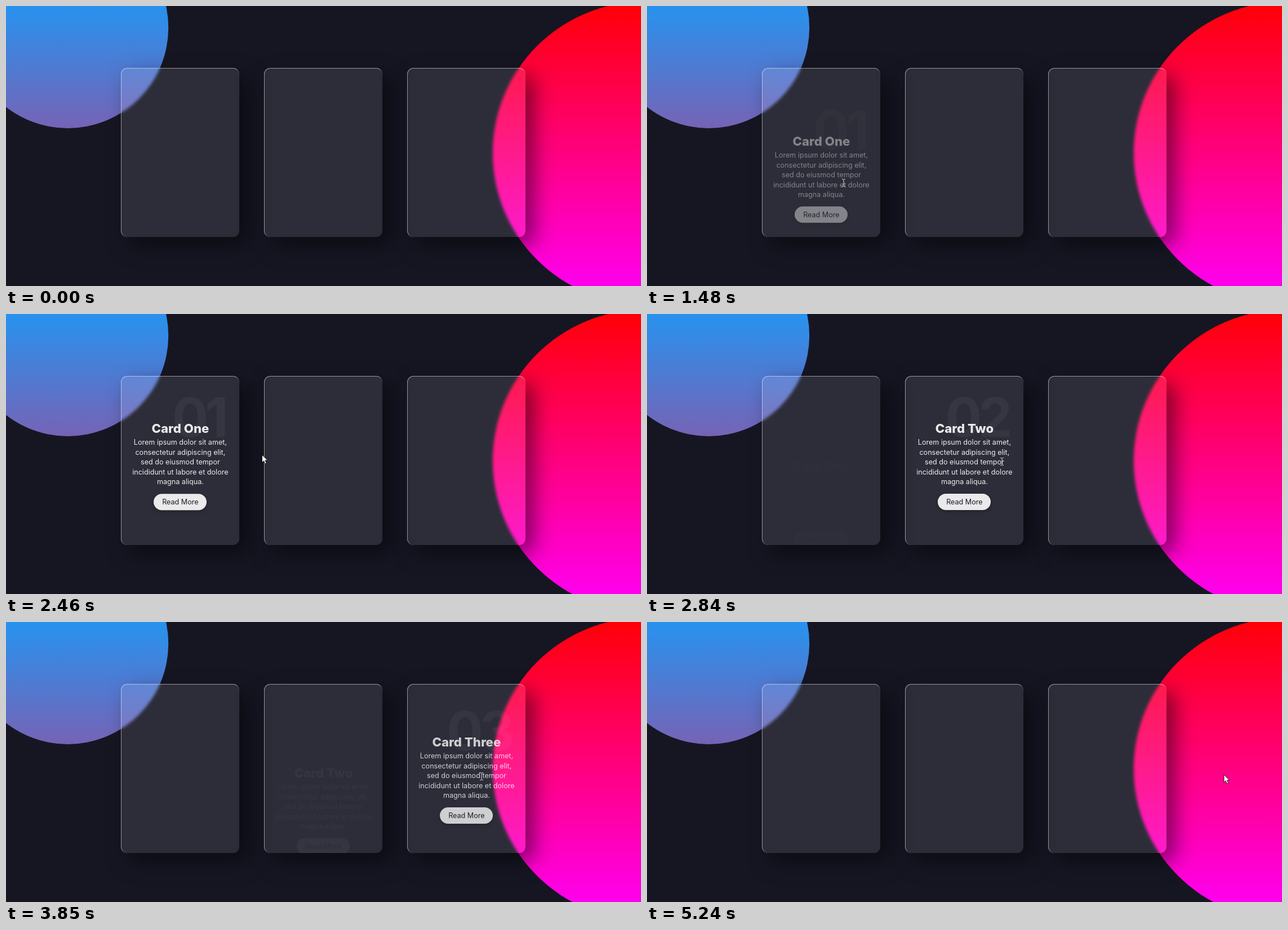
These frames come from a looping animation (1127 by 497 pixels, 5470 ms). An HTML page:

```html
<!DOCTYPE html>
<html lang="en">
<head>
<meta charset="utf-8">
<title>Glass cards</title>
<style>
  html, body { margin: 0; width: 100%; height: 100%; overflow: hidden; background: #161623; }
  body { position: relative; font-family: Inter, "Open Sans", sans-serif; }
  * { box-sizing: border-box; }

  .glow { position: absolute; left: -4px; top: -17px; width: 1136px; height: 553px; }
  .red { background: linear-gradient(#f00, #f0f); clip-path: circle(268.2px at 1136px 277.7px); }
  .blue { background: linear-gradient(#2196f3, #e91e63); clip-path: circle(178.6px at 113.6px 55.3px); }

  .card {
    position: absolute; top: 110px; width: 210px; height: 300px; overflow: hidden;
    border-radius: 11px; background: rgba(255, 255, 255, .1);
    border-top: 1px solid rgba(255, 255, 255, .5);
    border-left: 1px solid rgba(255, 255, 255, .5);
    box-shadow: 15px 15px 37px rgba(0, 0, 0, .5);
    backdrop-filter: blur(2.8px);
  }
  .content { position: absolute; left: -.6px; top: -1px; width: 210px; height: 300px; color: #fff; text-align: center; }
  .content > * { position: absolute; margin: 0; white-space: nowrap; }
  h2 { right: 26px; top: 16px; font-size: 95.6px; line-height: 100px; letter-spacing: -6px; color: rgba(255, 255, 255, .05); }
  h3 { left: 0; width: 100%; top: 71px; font-size: 22.2px; line-height: 30px; font-weight: 800; }
  p { left: 0; width: 100%; top: 102px; font-size: 12.6px; line-height: 17.5px; }
  .button {
    left: 58px; top: 202px; width: 94px; height: 29px; border-radius: 15px;
    background: #fff; color: #1c1a24; font-size: 12.6px; line-height: 29px;
    box-shadow: 0 3px 7px rgba(0, 0, 0, .25);
  }
  #cursor { position: absolute; left: 0; top: 0; width: 30px; height: 30px; overflow: visible; }
</style>
</head>
<body>
<div class="glow red"></div>
<div class="glow blue"></div>
<svg id="cursor">
  <path id="arrow" d="M0 0V13.6L3.1 10.7L5.3 15.8L7.7 14.8L5.5 9.8H9.8Z" fill="#fff" stroke="#000" stroke-width=".8"/>
  <path id="beam" d="M-3 -6.5H-1L0 -5.5L1 -6.5H3M0 -5.5V5.5M-3 6.5H-1L0 5.5L1 6.5H3" fill="none" stroke="#ddd" stroke-width="1"/>
</svg>
<script>
const LOOP = 5470, FADE = 500, RISE = 74.7;
const TOP = 110, WIDTH = 210, PITCH = 254, LEFT = 204;

const cards = [
  { name: 'One', enter: 1355, leave: 2410 },
  { name: 'Two', enter: 2525, leave: 3480 },
  { name: 'Three', enter: 3615, leave: 4765 }
];

// time, x, y of the pointer
const path = [
  [190, 1029, 489], [450, 775, 465], [700, 532, 453], [950, 440, 447],
  [1250, 391, 446], [1355, 383, 405], [1480, 349, 314], [1750, 336, 288],
  [2150, 336, 288], [2370, 412, 262], [2460, 454, 250], [2840, 630, 262],
  [3360, 630, 262], [3440, 668, 268], [3575, 713, 272], [3850, 844, 274],
  [4440, 844, 274], [4735, 920, 283], [4770, 935, 283], [4940, 1024, 271]
];

const cursor = document.getElementById('cursor');
const arrow = document.getElementById('arrow');
const beam = document.getElementById('beam');

cards.forEach((card, i) => {
  const box = document.createElement('div');
  box.className = 'card';
  card.x = LEFT + i * PITCH;
  box.style.left = card.x + 'px';
  box.innerHTML = `<div class="content"><h2>0${i + 1}</h2><h3>Card ${card.name}</h3>
    <p>Lorem ipsum dolor sit amet,<br>consectetur adipiscing elit,<br>sed do eiusmod tempor<br>
    incididunt ut labore et dolore<br>magna aliqua.</p><div class="button">Read More</div></div>`;
  document.body.insertBefore(box, cursor);
  card.content = box.firstChild;
});

const bezier = (a, b, u) => 3 * a * u * (1 - u) ** 2 + 3 * b * u * u * (1 - u) + u ** 3;

// CSS "ease": cubic-bezier(.25, .1, .25, 1)
function ease(t) {
  if (t <= 0) return 0;
  if (t >= 1) return 1;
  let lo = 0, hi = 1;
  for (let i = 0; i < 24; i++) {
    const mid = (lo + hi) / 2;
    if (bezier(.25, .25, mid) < t) lo = mid; else hi = mid;
  }
  return bezier(.1, 1, lo);
}

function pointAt(t) {
  const i = path.findIndex(p => p[0] > t);
  if (i < 0) return path[path.length - 1].slice(1);
  const [t0, x0, y0] = path[i - 1], [t1, x1, y1] = path[i];
  const k = (t - t0) / (t1 - t0);
  return [x0 + (x1 - x0) * k, y0 + (y1 - y0) * k];
}

function overText(x, y) {
  return cards.some(c => {
    const dx = x - c.x, dy = y - TOP - c.shift;
    return dx > 15 && dx < WIDTH - 15 && dy > 71 && dy < 190;
  });
}

function draw(t) {
  for (const c of cards) {
    const shown = ease((t - c.enter) / FADE) - ease((t - c.leave) / FADE);
    c.shift = (1 - shown) * RISE;
    c.content.style.opacity = shown;
    c.content.style.transform = `translateY(${c.shift}px)`;
  }
  const visible = t >= path[0][0];
  cursor.style.display = visible ? 'block' : 'none';
  if (!visible) return;
  const [x, y] = pointAt(t);
  const text = overText(x, y);
  cursor.style.transform = `translate(${x}px, ${y}px)`;
  arrow.style.display = text ? 'none' : '';
  beam.style.display = text ? '' : 'none';
}

const start = performance.now();
function tick() {
  draw((performance.now() - start) % LOOP);
  requestAnimationFrame(tick);
}
tick();
</script>
</body>
</html>
```
